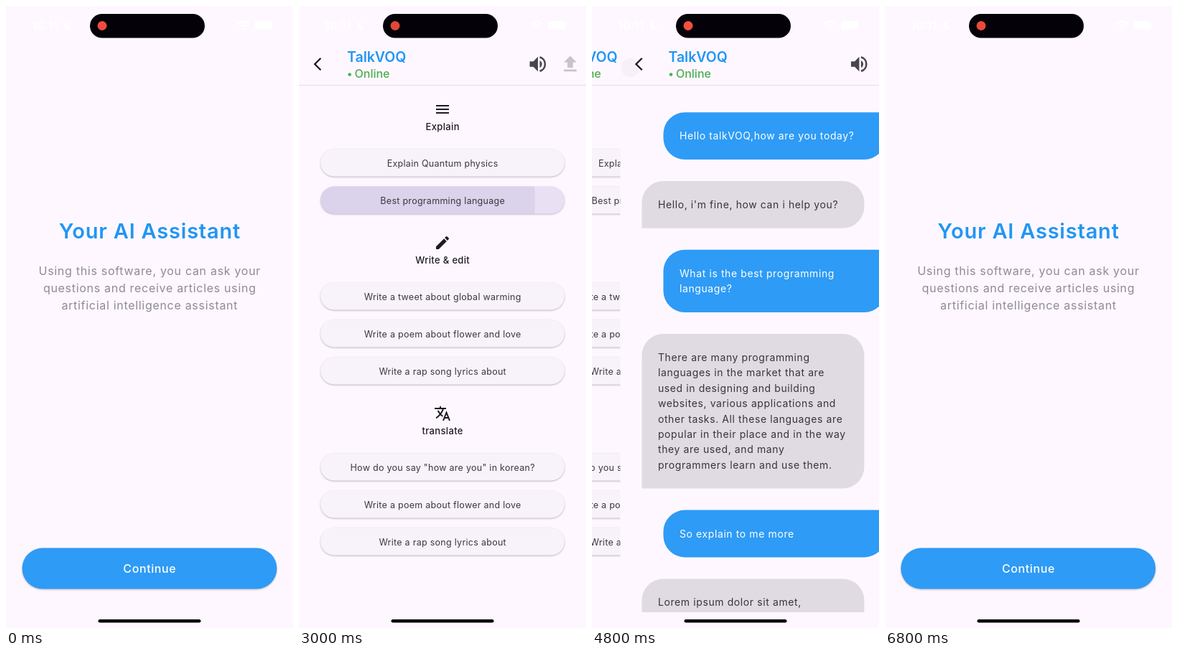
Recreate the animation shown at these times as an HTML page. Size 400 by 867 pixels, loop 6900 ms.

```html
<!DOCTYPE html>
<html lang="en">
<head>
<meta charset="utf-8">
<title>Assistant app</title>
<style>
  html, body { margin: 0; width: 100%; height: 100%; overflow: hidden; background: #fef7ff; }
  svg { display: block; width: 400px; height: 867px; font-family: Inter, sans-serif; }
  .raised { filter: drop-shadow(0 1px 1px #0004); }
</style>
</head>
<body>
<svg id="stage" viewBox="0 0 400 867"></svg>
<script>
const LOOP = 6900, STEP = 100, SLIDE = 500;
const BLUE = '#2e9bf6', INK = '#1d1b20';
const NAME = 'TalkVOQ';

// ---- markup helpers ----
const text = (x, y, str, size, spacing, fill, weight = 400, anchor = 'start') =>
  `<text x="${x}" y="${y}" font-size="${size}" letter-spacing="${spacing}" fill="${fill}"
    font-weight="${weight}" text-anchor="${anchor}">${str}</text>`;
const rect = (x, y, w, h, r, fill, more = '') =>
  `<rect x="${x}" y="${y}" width="${w}" height="${h}" rx="${r}" fill="${fill}" ${more}/>`;
const icon = (cx, cy, scale, body) =>
  `<g transform="translate(${cx} ${cy}) scale(${scale}) translate(-12 -12)">${body}</g>`;
const page = (id, body) =>
  `<g id="${id}">${rect(0, 0, 400, 867, 0, '#fef7ff')}${body}</g>`;

const volume = `<g fill="#49454f"><path d="M3 9v6h4l5 5V4L7 9zM14 8v8a4.5 4.5 0 0 0 0-8z"/>
  <path d="M14 4.3a8 8 0 0 1 0 15.4" fill="none" stroke="#49454f" stroke-width="2"/></g>`;
const upload = '<path fill="#c8c2ca" d="M5 20h14v-2H5zM5 10h4v6h6v-6h4l-7-7z"/>';
const menu = `<path d="M3 7h18M3 12h18M3 17h18" stroke="${INK}" stroke-width="2"/>`;
const pencil = `<path fill="${INK}" d="M3 17.2V21h3.8L17.8 9.9l-3.7-3.7zM20.7 7a1 1 0 0 0 0-1.4
  l-2.3-2.3a1 1 0 0 0-1.4 0l-1.9 1.8 3.8 3.8z"/>`;
const translate = `<path d="M1 5H17M9 2V5M13.2 5Q11 12.5 3.2 18.4M5.6 8Q8 13 12.4 16
  M13 22L17.5 10.7 22 22M14.8 18H20.2" fill="none" stroke="${INK}" stroke-width="2"/>`;

const header = id => `
  <circle id="${id}" cx="14" cy="86" r="13" fill="${INK}" opacity="0"/>
  <path d="M30.3 72.8L22 81l8.3 8.2" fill="none" stroke="${INK}" stroke-width="2.3"/>
  ${text(67, 78, NAME, 19.5, 0, '#2196f3', 600)}
  <circle cx="70.6" cy="95.5" r="2.3" fill="#4caf50"/>
  ${text(77.5, 100, 'Online', 16, 0, '#4caf50', 500)}
  ${icon(333, 81, 1.27, volume)}${icon(378, 81, 1.27, upload)}
  ${rect(0, 110, 400, 1, 0, '#e1dbe4')}`;

// ---- welcome page ----
const intro = ['Using this software, you can ask your', 'questions and receive articles using',
  'artificial intelligence assistant'];
const welcome = text(200.4, 324, 'Your AI Assistant', 29, .8, '#2196f3', 600, 'middle') +
  intro.map((s, i) => text(200.3, 375 + 24 * i, s, 16, .7, '#8f8a93', 400, 'middle')).join('') +
  rect(22.5, 755.5, 355, 57, 28.5, BLUE, 'class="raised"') +
  rect(22.5, 755.5, 355, 57, 28.5, '#6750a4', 'id="press" opacity="0"') +
  text(200.3, 790, 'Continue', 16, .6, '#fff', 500, 'middle');

// ---- topic list ----
const pill = (y, more) => rect(30, y - 19.5, 340, 38, 19, '#f8f2fb', more);
const pressedY = 271;
const ripple = `<g clip-path="url(#pillClip)" fill="#6750a4">
  <rect id="glow" x="30" y="250" width="340" height="42"/><circle id="ripple" cx="150" cy="${pressedY}"/></g>`;
const topic = (y, glyph, label, items) => icon(200, y, 1, glyph) +
  text(200.2, y + 29, label, 13, .35, INK, 500, 'middle') +
  items.map((s, i) => {
    const cy = y + 75 + 52 * i;
    return pill(cy, 'class="raised"') + (cy === pressedY ? ripple : '') +
      text(200.2, cy + 4.5, s, 12.5, .28, '#3c3840', 400, 'middle');
  }).join('');
const shared = ['Write a poem about flower and love', 'Write a rap song lyrics about'];
const list = `<clipPath id="pillClip">${pill(pressedY)}</clipPath>` + header('listBack') +
  topic(144, menu, 'Explain', ['Explain Quantum physics', 'Best programming language']) +
  topic(330, pencil, 'Write &amp; edit', ['Write a tweet about global warming', ...shared]) +
  topic(568, translate, 'translate', ['How do you say "how are you" in korean?', ...shared]);

// ---- conversation, alternating user and assistant ----
const talk = [
  ['Hello talkVOQ,how are you today?'],
  ["Hello, i'm fine, how can i help you?"],
  ['What is the best programming', 'language?'],
  ['There are many programming', 'languages in the market that are', 'used in designing and building',
   'websites, various applications and', 'other tasks. All these languages are',
   'popular in their place and in the way', 'they are used, and many', 'programmers learn and use them.'],
  ['So explain to me more'],
  ['Lorem ipsum dolor sit amet,', 'consectetur adipiscing elit']
];
let nextY = 148.2;
const bubbles = talk.map((lines, i) => {
  const mine = i % 2 === 0, x = mine ? 60 : 30, y = nextY, h = 44.4 + 21.4 * lines.length, r = 30;
  nextY += h + 30;
  const arc = (dx, dy) => `a${r} ${r} 0 0 1 ${dx} ${dy}`;
  const right = mine ? `H${x + 310}V${y + h - r}` : `H${x + 310 - r}${arc(r, r)}V${y + h - r}`;
  const left = mine ? `H${x + r}${arc(-r, -r)}` : `H${x}`;
  return `<path d="M${x} ${y + r}${arc(r, -r)}${right}${arc(-r, r)}${left}z" fill="${mine ? BLUE : '#e0dbe2'}"/>` +
    lines.map((s, n) => text(x + 22.5, y + 38 + 21.4 * n, s, 14, .6, mine ? '#fff' : '#38343b')).join('');
}).join('');
const chat = '<clipPath id="bodyClip"><path d="M0 111H400V845H0z"/></clipPath>' +
  header('chatBack') + `<g clip-path="url(#bodyClip)">${bubbles}</g>`;

// ---- system overlay ----
const overlay = `
  ${text(36, 33, '10:11', 16, 0, '#fff', 600)}
  <path d="M87 22a5.5 5.5 0 1 0 4 9a6 6 0 0 1-4-9z" fill="#fff"/>
  <path d="M323 25q8-6 16 0M326 28.5q5-4 10 0M329.5 32h3" fill="none" stroke="#fff" stroke-width="2.2"/>
  ${rect(347, 21, 24, 12, 4, '#fff')}
  ${rect(117, 11, 160, 33.5, 16.75, '#050108')}
  <circle id="rec" cx="134" cy="27.5" r="6.5"/>
  ${rect(128.5, 855, 143, 4.5, 2.25, '#000')}`;

const $ = id => document.getElementById(id);
$('stage').innerHTML = page('welcome', welcome) + page('list', list) + page('chat', chat) + overlay;

// ---- easing ----
const ramp = (t, a, b) => Math.min(1, Math.max(0, (t - a) / (b - a)));
const bezier = (x, [x0, y0, x1, y1, x2, y2, x3, y3]) => {
  const at = (u, a, b, c, d) => {
    const v = 1 - u;
    return v * v * v * a + 3 * v * v * u * b + 3 * v * u * u * c + u * u * u * d;
  };
  let lo = 0, hi = 1;
  for (let i = 0; i < 24; i++) {
    const mid = (lo + hi) / 2;
    if (at(mid, x0, x1, x2, x3) < x) lo = mid; else hi = mid;
  }
  return at(hi, y0, y1, y2, y3);
};
const slideEase = s => s <= 0 ? 0 : s >= 1 ? 1 : bezier(s, s < .198
  ? [0, 0, .056, .024, .108, .3085, .198, .541]
  : [.198, .541, .3655, 1, .5465, .989, 1, 1]);

// Offset of the entering page and the slower shift of the page below it.
const route = (t, open, close) => {
  const going = t >= close, from = going ? close : open;
  const s = ramp(t, from, from + SLIDE);
  const front = going ? 1 - slideEase(s) : slideEase(s);
  const q = going ? 1 - s : s;
  const back = q <= 0 || q >= 1 ? q
    : bezier(q, going ? [0, 0, .67, .03, .65, .09, 1, 1] : [0, 0, .35, .91, .33, .97, 1, 1]);
  return { x: 400 * (1 - front), under: -400 / 3 * back };
};
const move = (id, x) => $(id).setAttribute('transform', `translate(${x.toFixed(2)} 0)`);
const fade = (id, value) => $(id).setAttribute('opacity', value);
const pulse = (t, a, b, c, d) => ramp(t, a, b) - ramp(t, c, d);

function draw(now) {
  const t = Math.floor(now % LOOP / STEP) * STEP;
  const toList = route(t, 1125, 6330), toChat = route(t, 3040, 4772);
  move('welcome', toList.under);
  move('list', toList.x + toChat.under);
  move('chat', toChat.x);

  fade('press', .13 * pulse(t, 900, 1100, 1100, 1500));
  const glow = .1 * pulse(t, 2800, 2900, 3100, 3400);
  fade('glow', glow);
  fade('ripple', glow);
  $('ripple').setAttribute('r', Math.max(0, 60 + (t - 2900) * 1.19));
  fade('chatBack', .03 * pulse(t, 4650, 4750, 4800, 5000));
  fade('listBack', .03 * pulse(t, 6200, 6300, 6400, 6600));

  const light = Math.cos((t - 1100) / 4400 * 2 * Math.PI);
  $('rec').setAttribute('fill', `rgb(${238 + 17 * light},${76 + 6 * light},${62 + 6 * light})`);
}

const start = performance.now();
function tick() {
  draw(performance.now() - start);
  requestAnimationFrame(tick);
}
tick();
</script>
</body>
</html>
```
